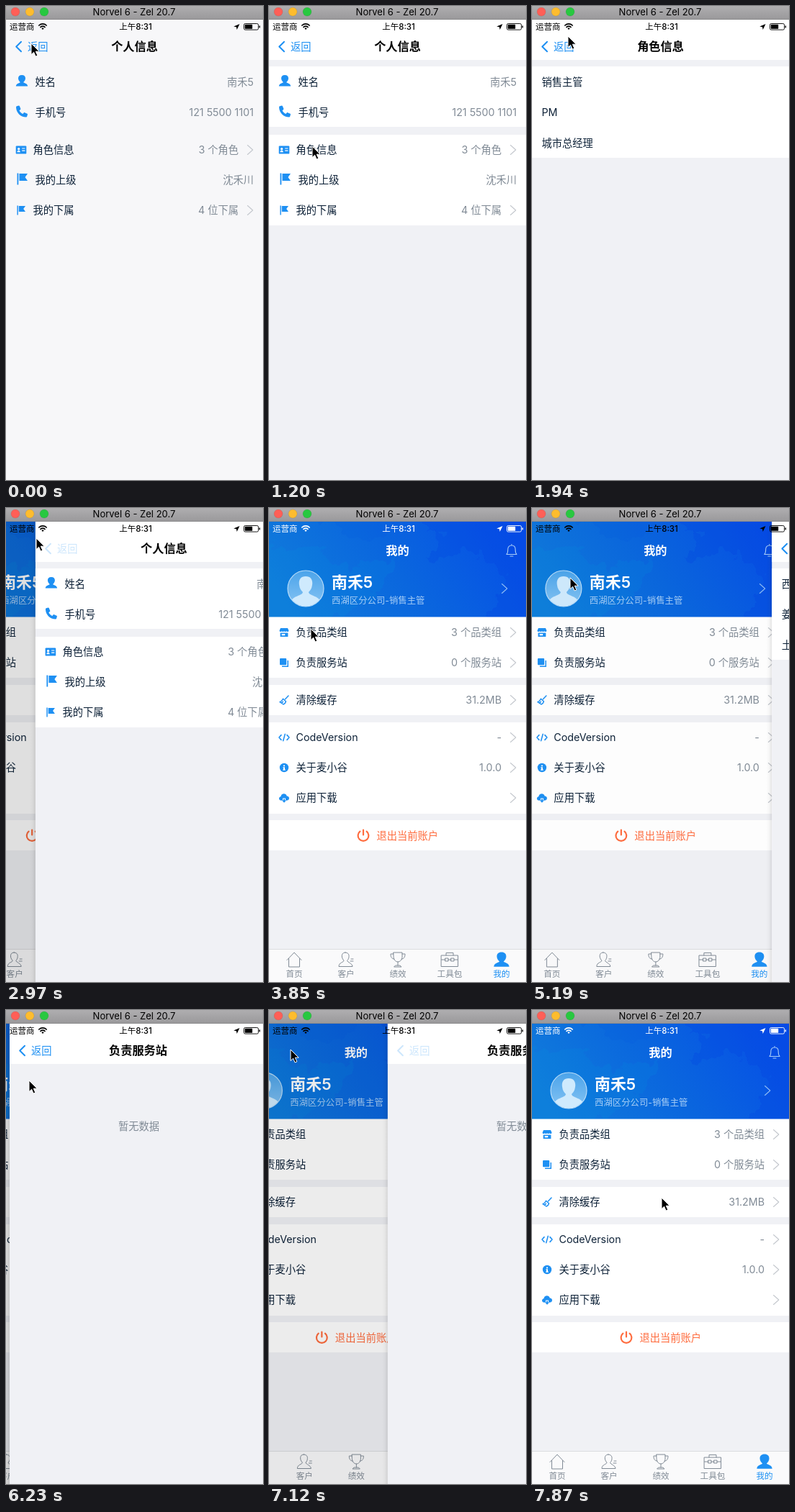
These frames come from a looping animation (357 px wide and 659 px high, 8 s). An HTML page:

```html
<!DOCTYPE html>
<html lang="zh-CN">
<head>
<meta charset="utf-8">
<title>Settings navigation</title>
<style>
  html, body { margin: 0; width: 100%; height: 100%; overflow: hidden; background: #f0f1f5; }
  svg { display: block; width: 100vw; height: 100vh; }
  text { font-family: Inter, "Noto Sans CJK SC", "Noto Sans CJK", sans-serif; white-space: pre; }
  .bg { fill: #f0f1f5; }
  .panel { fill: #fff; }
  .flat .bg, .flat .panel { fill: #f7f7f9; }
  .line { fill: none; stroke-linecap: round; stroke-linejoin: round; }
</style>
</head>
<body>
<svg id="stage" viewBox="0 0 357 659"></svg>
<script>
const W = 357, H = 659, LOOP = 8000;
const BLUE = '#1e90f3', INK = '#0e2238', GREY = '#818b96', ORANGE = '#ff6c3e', EDGE = '#c4c8ce';

// Drawing helpers
const rect = (x, y, w, h, fill, more = '') =>
  `<rect x="${x}" y="${y}" width="${w}" height="${h}" fill="${fill}" ${more}/>`;
const panel = (top, bottom) => `<rect class="panel" y="${top}" width="${W}" height="${bottom - top}"/>`;
const text = (str, x, y, size, fill, anchor = 'start', weight = 400) =>
  `<text x="${x}" y="${(y + size * 0.37).toFixed(2)}" font-size="${size}" fill="${fill}" ` +
  `text-anchor="${anchor}" font-weight="${weight}">${str}</text>`;
const line = (d, color, width = 1) => `<path class="line" d="${d}" stroke="${color}" stroke-width="${width}"/>`;
const shape = (d, fill = BLUE) => `<path d="${d}" fill="${fill}" fill-rule="evenodd"/>`;
const at = (x, y, body) => `<g transform="translate(${x} ${y})">${body}</g>`;
const chevron = (y, x = 335.5, color = EDGE) => line(`M${x} ${y - 6.5}l7.3 6.5l-7.3 6.5`, color, 1.1);

// Icons are centred on 0,0
const bust = 'M0-8C-3.4-8-5-6-5-3.4C-5-.8-3.4 1-2.2 2C-2.6 3.2-8.2 3.6-8.2 7.5H8.2C8.2 3.6 2.6 3.2 2.2 2C3.4 1 5-.8 5-3.4C5-6 3.4-8 0-8Z';
const flagPath = 'M-7-8H-5.2V8H-7ZM-4-7.5H7.5L4-2.6L7.5 2.5H-4Z';
const icons = {
  person: at(0, -1.5, shape(bust)),
  phone: at(0, -1, shape('M-7-7.2L-4.3-8C-3.8-8-3.4-7.8-3.2-7.4L-1.7-3.8C-1.5-3.3-1.6-3-2-2.6L-3.5-1.3C-2.6 .8-.8 2.6 1.4 3.5L2.7 2C3 1.6 3.5 1.5 4 1.7L7.5 3.2C8 3.4 8.1 3.8 8 4.3L7.2 7.1C7 7.7 6.7 8 6 8C-1.8 8-8 1.8-8-6C-8-6.7-7.6-7-7-7.2Z')),
  card: rect(-7.3, -5.6, 14.6, 11.2, BLUE, 'rx="1.2"') +
    shape('M-3.3-3A1.7 1.7 0 1 1-3.4-3ZM-5.6 3.3C-5.6 0-1.2 0-1.2 3.3ZM1.2-2.6H5.4V-1.4H1.2ZM1.2 .6H5.4V1.8H1.2Z', '#fff'),
  flag: at(0, -1.5, shape(flagPath)),
  smallFlag: `<g transform="scale(.8)">${shape(flagPath)}</g>`,
  shop: shape('M-5-6H5L6.5-2.6C6.5-.6 3.4-.6 3.2-2C2.8-.6.4-.6 0-2C-.4-.6-2.8-.6-3.2-2C-3.4-.6-6.5-.6-6.5-2.6ZM-5.4 .6H5.4V6H-5.4ZM-3.3 2V4.2H1.2V2Z'),
  layers: rect(-6, -6, 9.2, 9.2, BLUE, 'rx="1"') + shape('M4.5-3H6V6H-3V4.5H4.5Z'),
  broom: line('M6-6L1.5-1.2M-1.5-1.8L2.5 2M-1.5-1.8C-2.5 .6-4 2-6 2.6L-1 6C.8 5.2 2 4 2.5 2M-3.4 4.2L-1.6 2.4', BLUE, 1.5),
  code: line('M-4-3.4L-7 0L-4 3.4M4-3.4L7 0L4 3.4M1.3-4.6L-1.3 4.6', BLUE, 1.6),
  info: `<circle r="6.2" fill="${BLUE}"/>` + shape('M-1-3.6H1V-1.8H-1ZM-1.6-.8H1V2.6H1.8V3.8H-1.8V2.6H-1V.4H-1.6Z', '#fff'),
  cloud: shape('M-4 3.6C-8 3.4-7.8-1.4-4.6-1.8C-4.2-7 3-7 3.8-2.4C8-2.4 8 3.4 4.2 3.6H2V.6H-2V3.6ZM-1 1.6H1V3.6H3L0 6.8L-3 3.6H-1Z'),
  power: line('M-4.6-5.8A7.4 7.4 0 1 0 4.6-5.8M0-8V-1', ORANGE, 2.2),
  home: line('M-10 .5L0-10L10 .5M-7.5-1.5V10H7.5V-1.5', GREY),
  client: line('M-1-10C-5-10-6-7-5.6-4C-5.3-1.5-4 0-3 1C-3 4-10 3.5-10 9.5H9C9 5 2 4 1.6 1C3 0 4 -2 4-4.5C4.4-8 2-10-1-10ZM7-1H10M6 2H10', GREY),
  cup: line('M-6-10H6V-4C6 0 3 3 0 3S-6 0-6-4ZM-6-8H-10C-10-3-8-1-5-1M6-8H10C10-3 8-1 5-1M0 3V8M-5 10H5L3 8H-3Z', GREY),
  tools: line('M-11.5-6H11.5V9.5H-11.5ZM-5-6V-9.5H5V-6M-11.5 0H-6M-2 0H2M6 0H11.5M-6-2H-2V2H-6ZM2-2H6V2H2Z', GREY),
  me: `<g transform="scale(1.3)">${shape(bust)}</g>`,
};

const row = (y, label, { icon, value, more, x = 37.5, ix = 21 } = {}) =>
  (icon ? at(ix, y, icons[icon]) : '') + text(label, x, y, 14.28, INK) +
  (value ? text(value, more ? 323 : 344, y, 14.28, GREY, 'end') : '') + (more ? chevron(y) : '');

const subPage = (title, body) =>
  `<rect class="bg" y="19" width="${W}" height="${H - 19}"/>` + panel(19, 75) +
  `<g class="back">${line('M21 49.7L14.2 56.5L21 63.3', BLUE, 2)}${text('返回', 30, 57, 14.28, BLUE)}</g>` +
  text(title, 178.5, 56.5, 16.2, '#000', 'middle', 600) + body;

const tab = (i, icon, label, color = GREY) =>
  at(35 + 72 * i, 628, icons[icon]) + text(label, 35 + 72 * i, 648, 11.6, color, 'middle');

// Painted sky: soft patches with ragged edges
const hero = rect(0, 19, W, 133, 'url(#sky)') + `<g clip-path="url(#heroBox)"><g filter="url(#ragged)">` +
  shape('M-20 60L60 50L110 84L180 66L150 118L70 170H-20Z', 'rgba(20,150,220,.14)') +
  shape('M190 0L240 44L225 72L290 60L330 98L300 170H380V0Z', 'rgba(0,50,225,.2)') +
  shape('M60 0H190L160 46L105 40Z', 'rgba(0,80,215,.14)') + '</g></g>';

const avatar = `<circle cx="51" cy="112" r="25" fill="url(#face)" stroke="#b9dcf8" stroke-width="1.2"/>
  <g clip-path="url(#round)"><path d="M51 95C43 95 41 101 42 107C42.5 112 45 115 47 117C46 123 31 121 29 134V139H73V134C71 121 56 123 55 117C57 115 59.5 112 60 107C61 101 59 95 51 95Z" fill="#cfeafd"/></g>`;

const pages = {
  mine: `<rect class="bg" y="19" width="${W}" height="${H - 19}"/>` + hero +
    text('我的', 178.5, 59, 16.2, '#fff', 'middle', 600) +
    at(337, 59, line('M-7 5.5H7C5 3.5 5.2 1 5.2-1.5C5.2-5 3-7 0-7S-5.2-5-5.2-1.5C-5.2 1-5 3.5-7 5.5ZM-2 8H2M0-8.4V-7', '#a9cdf8', 1.1)) +
    avatar + text('南禾5', 87, 103, 21.9, '#fff', 'start', 600) +
    text('西湖区分公司-销售主管', 87, 128, 12.38, '#a6cdf6') + chevron(112, 323.5, '#8fbcf5') +
    panel(151.5, 236) + panel(246, 288) + panel(298, 425) + panel(434, 476) +
    row(173, '负责品类组', { icon: 'shop', value: '3 个品类组', more: true }) +
    row(215, '负责服务站', { icon: 'layers', value: '0 个服务站', more: true }) +
    row(267, '清除缓存', { icon: 'broom', value: '31.2MB', more: true }) +
    row(319, 'CodeVersion', { icon: 'code', value: '-', more: true }) +
    row(361, '关于麦小谷', { icon: 'info', value: '1.0.0', more: true }) +
    row(403, '应用下载', { icon: 'cloud', more: true }) +
    at(131, 455.5, icons.power) + text('退出当前账户', 149.5, 455.5, 14.28, ORANGE) +
    rect(0, 613, W, 46, '#fafafb') + rect(0, 613, W, 1, '#dcdde0') +
    tab(0, 'home', '首页') + tab(1, 'client', '客户') + tab(2, 'cup', '绩效') +
    tab(3, 'tools', '工具包') + tab(4, 'me', '我的', BLUE),
  info: subPage('个人信息', panel(84, 168) + panel(179, 305) +
    row(105.5, '姓名', { icon: 'person', value: '南禾5', x: 40.5, ix: 22 }) +
    row(147.5, '手机号', { icon: 'phone', value: '121 5500 1101', x: 40.5, ix: 22 }) +
    row(200, '角色信息', { icon: 'card', value: '3 个角色', more: true }) +
    row(242, '我的上级', { icon: 'flag', value: '沈禾川', x: 40.5, ix: 22.5 }) +
    row(284, '我的下属', { icon: 'smallFlag', value: '4 位下属', more: true })),
  roles: subPage('角色信息', panel(84, 211) +
    ['销售主管', 'PM', '城市总经理'].map((s, i) => row(105.7 + 42.3 * i, s, { x: 13.5 })).join('')),
  groups: subPage('负责品类组', panel(84, 211) +
    ['西甘辣组', '姜蒜组', '土胡洋组'].map((s, i) =>
      row(105.7 + 42.3 * i, s, { x: 13.5 }) + chevron(105.7 + 42.3 * i, 333)).join('')),
  stations: subPage('负责服务站', text('暂无数据', 179.5, 162, 14.28, GREY, 'middle')),
};

const statusBar = `<g id="status">
  ${text('运营商', 5, 29, 11.5, 'currentColor')}${text('上午8:31', 180, 29, 11.5, 'currentColor', 'middle', 500)}
  ${line('M45.8 27A7.4 7.4 0 0 1 56.2 27M48 29.4A4.4 4.4 0 0 1 54 29.4', 'currentColor', 1.7)}
  ${shape('M49.4 31.2A2.2 2.2 0 0 1 52.6 31.2L51 33Z', 'currentColor')}
  ${shape('M324.5 25L320.7 33L320 29.3L316.2 28.6Z', 'currentColor')}
  ${rect(330.5, 24.5, 20, 8.6, 'none', 'rx="1.8" stroke="currentColor" stroke-width=".9"')}
  ${rect(331.8, 25.8, 10.4, 6, 'currentColor', 'rx=".6"')}${rect(351.6, 27.2, 1.4, 3.2, 'currentColor', 'rx=".6"')}
</g>`;

const titleBar = rect(0, 0, W, 19, 'url(#bar)') + rect(0, 18, W, 1, '#8b8a8c') +
  ['#ff5f57', '#febc2e', '#28c840'].map((c, i) =>
    `<circle cx="${13 + 20 * i}" cy="8" r="6" fill="${c}" stroke="rgba(0,0,0,.14)" stroke-width=".6"/>`).join('') +
  text('Norvel 6 - Zel 20.7', 178, 8.6, 13, '#000', 'middle');

const stage = document.getElementById('stage');
stage.innerHTML = `<defs>
  <linearGradient id="sky" x1="0" y1=".6" x2="1" y2=".35"><stop stop-color="#107bdb"/><stop offset=".5" stop-color="#0a66de"/><stop offset="1" stop-color="#0650e6"/></linearGradient>
  <linearGradient id="face" x2="0" y2="1"><stop stop-color="#4ba3ea"/><stop offset="1" stop-color="#86c4f3"/></linearGradient>
  <linearGradient id="bar" x2="0" y2="1"><stop stop-color="#afaeb0"/><stop offset="1" stop-color="#99989a"/></linearGradient>
  <linearGradient id="shade"><stop stop-opacity="0"/><stop offset=".5" stop-opacity=".025"/><stop offset="1" stop-opacity=".1"/></linearGradient>
  <filter id="ragged"><feTurbulence type="fractalNoise" baseFrequency=".05" numOctaves="3" seed="4"/><feDisplacementMap in="SourceGraphic" scale="34" xChannelSelector="R" yChannelSelector="G"/></filter>
  <clipPath id="heroBox"><rect y="19" width="${W}" height="133"/></clipPath>
  <clipPath id="round"><circle cx="51" cy="112" r="24.5"/></clipPath>
</defs>` +
  Object.entries(pages).map(([id, body]) => `<g id="${id}">${rect(-8, 19, 8, H - 19, 'url(#shade)')}${body}` +
    `${rect(0, 19, W, H - 19, '#000', 'class="dim" opacity="0"')}</g>`).join('') +
  statusBar + titleBar +
  `<path id="cursor" d="M0 0V15.6L3.6 12.2L6.1 18L8.8 16.8L6.3 11.2H11.2Z" fill="#000" stroke="#fff" stroke-width="1"/>`;
const get = id => document.getElementById(id);

// Times at which the picture refreshes
const ticks = [0, 150, 600, 750, 900, 1050, 1200, 1350, 1500, 1650, 1800, 1940, 2240, 2390, 2540, 2690, 2840,
  2970, 3110, 3260, 3400, 3550, 3850, 4000, 4150, 4300, 4450, 4600, 4890, 5040, 5190, 5340, 5490, 5640, 5790,
  5940, 6080, 6230, 6380, 6530, 6680, 6820, 6970, 7120, 7270, 7420, 7570, 7720, 7870];

// start, upper page, lower page, is push
const moves = [
  [-1000, 'info', 'mine', true], [1200, 'roles', 'info', true], [2330, 'roles', 'info', false],
  [2953.5, 'info', 'mine', false], [3920, 'groups', 'mine', true], [4968, 'groups', 'mine', false],
  [5905, 'stations', 'mine', true], [7050, 'stations', 'mine', false],
];

// time, x, y of the pointer tip
const pointer = [
  [0, 35, 52], [150, 35, 53], [450, 35, 53], [1050, 60, 195], [1200, 60, 195], [1500, 56, 110], [1940, 50, 42],
  [2390, 46, 43], [2970, 42, 42], [3260, 46, 75], [3550, 56, 160], [3850, 58, 168], [4000, 55, 160],
  [4300, 28, 62], [4600, 30, 54], [4890, 30, 54], [5190, 53, 97], [5640, 60, 202], [5940, 60, 208],
  [6230, 32, 98], [6530, 30, 55], [7120, 30, 55], [7420, 66, 105], [7870, 180, 261],
];

const cubic = (s, a, b) => 3 * (1 - s) ** 2 * s * a + 3 * (1 - s) * s * s * b + s ** 3;
function ease(p) {
  if (p >= 1) return 1;
  let lo = 0, hi = 1;
  for (let i = 0; i < 24; i++) {
    const mid = (lo + hi) / 2;
    if (cubic(mid, 0.2833, 0.31833) < p) lo = mid; else hi = mid;
  }
  return cubic(lo, 0.99, 0.99);
}

function pointerAt(t) {
  const i = pointer.findLastIndex(k => k[0] <= t);
  const [t0, x0, y0] = pointer[i], [t1, x1, y1] = pointer[i + 1] || [LOOP, x0, y0];
  const p = (t - t0) / (t1 - t0);
  return [x0 + (x1 - x0) * p, y0 + (y1 - y0) * p];
}

function place(id, x, dim) {
  const page = get(id);
  page.style.display = '';
  page.setAttribute('transform', `translate(${x.toFixed(2)} 0)`);
  page.querySelector('.dim').setAttribute('opacity', dim);
}

function draw(t) {
  const [start, upper, lower, push] = moves.findLast(m => m[0] <= t);
  const done = ease((t - start) / 500), cover = push ? done : 1 - done;
  for (const id in pages) get(id).style.display = 'none';
  place(lower, -0.3 * W * cover, 0.14 * cover);
  if (cover > 0) place(upper, W * (1 - cover), 0);

  const pressed = moves.some(m => !m[3] && t > m[0] - 60 && t < m[0] + 130);
  get(upper).querySelector('.back').setAttribute('opacity', pressed ? 0.22 : 1);
  get('info').classList.toggle('flat', t < 1200);
  get('status').style.color = lower === 'mine' && cover === 0 ? '#fff' : '#000';
  get('cursor').setAttribute('transform', `translate(${pointerAt(t).join(' ')})`);
}

const origin = performance.now();
let shown = -1;
function tick() {
  const t = (performance.now() - origin) % LOOP;
  const now = ticks.findLast(k => k <= t) ?? 0;
  if (now !== shown) draw(shown = now);
  requestAnimationFrame(tick);
}
tick();
</script>
</body>
</html>
```
